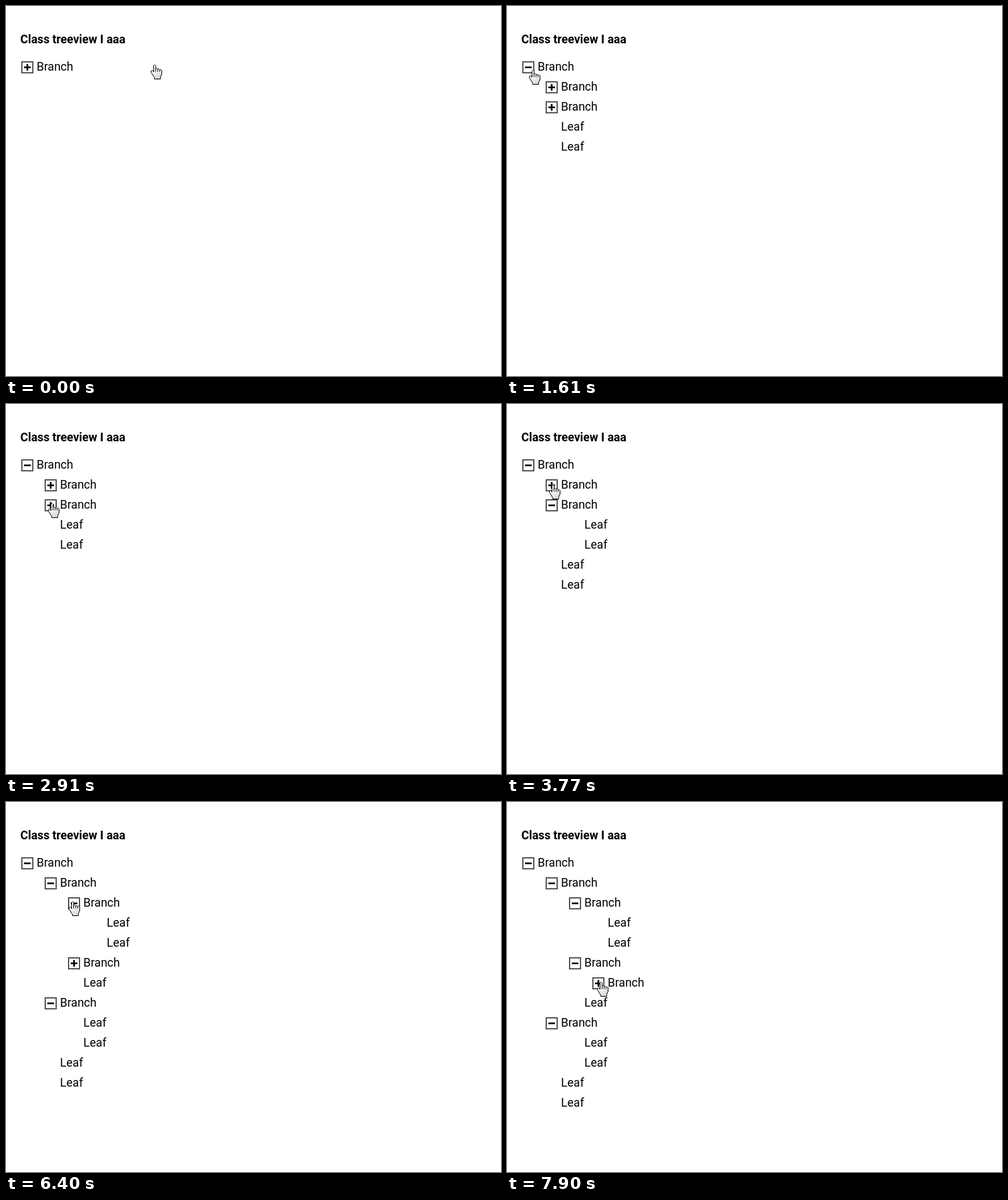
An HTML page with a canvas that plays this animation: 742 by 555 pixels, repeating every 7.99 s.

```html
<!DOCTYPE html>
<html lang="en">
<head>
<meta charset="utf-8">
<title>Tree view</title>
<style>
  html, body { margin: 0; width: 100%; height: 100%; overflow: hidden; background: #fff; }
  canvas { display: block; }
</style>
</head>
<body>
<canvas id="stage" width="742" height="555"></canvas>
<script>
const canvas = document.getElementById('stage');
const ctx = canvas.getContext('2d');
const LOOP = 7990;
const STEP = 75;
const ROW = 30;
const INDENT = 35;
const BOX = 18;
const FONT = '17.6px Roboto, sans-serif';

const leaf = () => ({ label: 'Leaf' });
const branch = (opensAt, ...children) => ({ label: 'Branch', opensAt, children });

const tree = branch(1400,
  branch(4010,
    branch(6400, leaf(), leaf()),
    branch(7670, branch(Infinity, leaf())),
    leaf()),
  branch(3070, leaf(), leaf()),
  leaf(),
  leaf());

const move = (begin, end, x, y) => ({ begin, end, x, y });
const home = { x: 217, y: 88 };
const moves = [
  move(270, 750, 59, 104),
  move(830, 1070, 32, 95),
  move(1610, 2140, 57, 125),
  move(2460, 2910, 63, 149),
  move(3550, 3770, 63, 121),
  move(4640, 4780, 72, 137),
  move(4870, 5330, 94, 149),
  move(6530, 6960, 98, 224),
  move(7130, 7500, 102, 240),
  move(7745, 7900, 135, 270)
];

const ease = p => p * p * (3 - 2 * p);
const mix = (a, b, p) => Math.round(a + (b - a) * p);

// The pointer advances in small steps, like a screen recording.
function pointerAt(time) {
  let from = home;
  for (const to of moves) {
    if (time < to.begin) break;
    if (time < to.end) {
      const elapsed = (Math.floor((time - to.begin) / STEP) + 1) * STEP;
      const p = ease(Math.min(1, elapsed / (to.end - to.begin + STEP)));
      return { x: mix(from.x, to.x, p), y: mix(from.y, to.y, p) };
    }
    from = to;
  }
  return from;
}

function drawFrame(x, y, inset, color) {
  ctx.strokeStyle = color;
  ctx.strokeRect(x + inset, y + inset, BOX - 2 * inset, BOX - 2 * inset);
}

function drawToggle(x, y, open) {
  const center = BOX / 2, length = 10, weight = 2.5;
  ctx.lineWidth = 1;
  drawFrame(x, y, 0.5, '#2c2c30');
  drawFrame(x, y, 1.5, '#8c8c92');
  ctx.fillStyle = '#000';
  ctx.fillRect(x + center - length / 2, y + center - weight / 2, length, weight);
  if (!open) ctx.fillRect(x + center - weight / 2, y + center - length / 2, weight, length);
}

// Draws a node with its open children and returns the next free row.
function drawNode(node, depth, row, time) {
  const x = 23 + depth * INDENT;
  const y = 83 + row * ROW;
  const open = time >= node.opensAt;
  if (node.children) drawToggle(x, y, open);
  ctx.fillStyle = '#000';
  ctx.fillText(node.label, x + 23, y + 14);
  row++;
  if (open) {
    for (const child of node.children) row = drawNode(child, depth + 1, row, time);
  }
  return row;
}

function makeHand() {
  const outline = new Path2D('M4.5 11');
  const creases = new Path2D();
  for (let finger = 0; finger < 4; finger++) {
    const x = 4.5 + 3 * finger;
    const top = finger ? 4.5 + finger : 0.5;
    outline.lineTo(x, top + 1);
    outline.lineTo(x + 1, top);
    outline.lineTo(x + 2, top);
    outline.lineTo(x + 3, top + 1);
    if (finger) {
      creases.moveTo(x, top);
      creases.lineTo(x, 10.5);
    }
  }
  outline.addPath(new Path2D());
  const palm = [[16.5, 14], [14.5, 18.5], [14.5, 21.5], [5.5, 21.5], [5.5, 19.5],
    [0.5, 11.5], [0.5, 9.5], [2.5, 8.5]];
  for (const [x, y] of palm) outline.lineTo(x, y);
  outline.closePath();
  const shade = ctx.createLinearGradient(3, 8, 12, 22);
  shade.addColorStop(0, '#fff');
  shade.addColorStop(1, '#d2d2d2');
  return { outline, creases, shade };
}

const hand = makeHand();

function drawPointer({ x, y }) {
  ctx.save();
  ctx.translate(x, y);
  ctx.fillStyle = hand.shade;
  ctx.fill(hand.outline);
  ctx.strokeStyle = '#000';
  ctx.lineWidth = 1;
  ctx.stroke(hand.outline);
  ctx.stroke(hand.creases);
  ctx.restore();
}

function draw(time) {
  ctx.fillStyle = '#fff';
  ctx.fillRect(0, 0, canvas.width, canvas.height);
  ctx.fillStyle = '#000';
  ctx.font = 'bold ' + FONT;
  ctx.fillText('Class treeview I aaa', 21.5, 56);
  ctx.font = FONT;
  drawNode(tree, 0, 0, time);
  drawPointer(pointerAt(time));
}

const start = performance.now();
function tick() {
  draw((performance.now() - start) % LOOP);
  requestAnimationFrame(tick);
}
tick();
</script>
</body>
</html>
```
